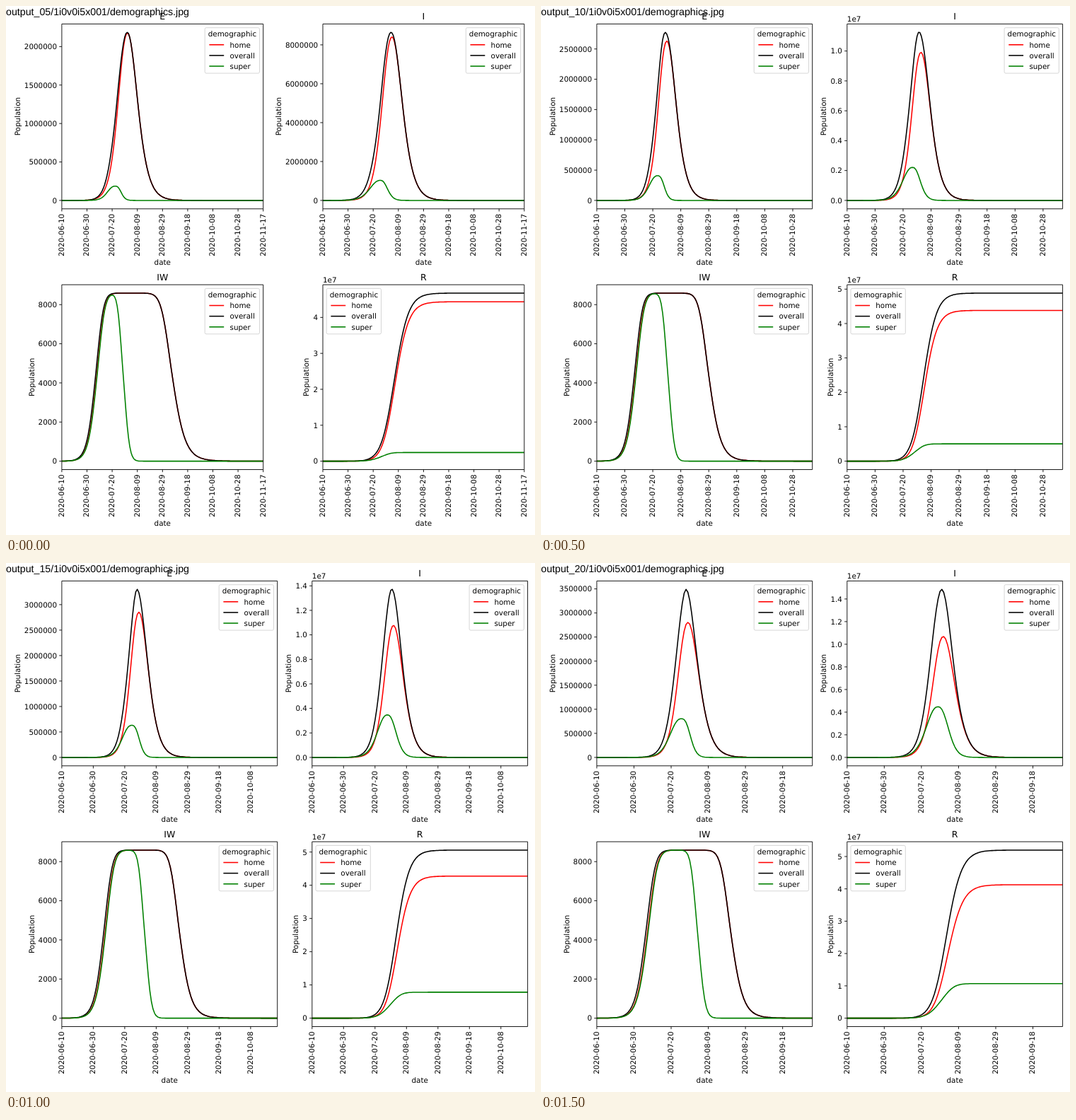
Write an HTML page that moves like this. It is 748x748 px and loops after 2 s.

```html
<!DOCTYPE html>
<html lang="en">
<head>
<meta charset="utf-8">
<title>Demographics</title>
<style>
html, body { margin: 0; width: 100%; height: 100%; overflow: hidden; background: #fff; }
svg { display: block; width: 748px; height: 748px; text-rendering: geometricPrecision; }
text { font: 10.39px "DejaVu Sans", sans-serif; }
.title { font-size: 12.47px; }
.path { font: 14.21px "Liberation Sans", Arial, sans-serif; }
.axis { fill: none; stroke: #000; stroke-width: .9; }
.line { fill: none; stroke-width: 1.56; stroke-linejoin: round; }
.box { fill: #fff; fill-opacity: .8; stroke: #ccc; stroke-opacity: .8; }
.scene { visibility: hidden; animation: show 2s step-end infinite; }
@keyframes show { 0% { visibility: visible; } 25%, 100% { visibility: hidden; } }
</style>
</head>
<body>
<svg id="stage" viewBox="0 0 748 748"></svg>
<script>
const EM = 10.39, LEFT = 78.9, TOP = 25.4, ROW = 368.7;
const HEIGHT = 261.4, PEAK = HEIGHT / 1.1, ZERO = PEAK * 1.05;
const SERIES = [['home', '#f00'], ['overall', '#000'], ['super', '#008000']];
const UNITS = { E: .5, I: 2, R: 10, IW: 2000 };

function add(parent, tag, attrs, content) {
  const el = document.createElementNS('http://www.w3.org/2000/svg', tag);
  for (const key in attrs) el.setAttribute(key, attrs[key]);
  if (content !== undefined) el.textContent = content;
  return parent.appendChild(el);
}

function label(parent, content, x, y, anchor = 'start', upright = false, cls = '') {
  const attrs = { x, y, 'text-anchor': anchor, class: cls };
  if (upright) attrs.transform = `rotate(-90 ${x} ${y})`;
  add(parent, 'text', attrs, content);
}

const textWidth = s => EM * [...s].reduce((sum, c) => sum + (c === '.' ? .318 : .636), 0);

// Epidemic wave with its own width and sharpness on each side.
const bell = (peak, left, right, kLeft, kRight) => t => {
  const d = t - peak;
  const u = d < 0 ? (-d / left) ** kLeft : (d / right) ** kRight;
  return 1 / Math.cosh(u) ** 2;
};

// Falling step; the upper and lower bends sharpen separately.
function drop(d, width, upper, lower) {
  const u = d / width;
  return 1 / (1 + Math.exp(u * (u < 0 ? 1 - upper * u : 1 + lower * u)));
}

function cumulate(values, total) {
  const sum = values.reduce((a, b) => a + b);
  let acc = 0;
  return values.map(v => (acc += v) / sum * total - v / sum * total / 2);
}

// Scene n has a super share of 5, 10, 15, 20 %; populations are in millions.
function makeScene(days, peakE, n) {
  const quad = (a, b, c = 0) => a + b * n + c * n * n;
  const times = Array.from({ length: days + 1 }, (_, day) => day);
  const total = quad(46.76, 2.25, -.17), superTotal = total * .0515 * (n + 1);
  const top = { E: peakE, I: peakE * quad(3.955, .1), R: total, IW: 8588 };

  const width = quad(9.6, -2.07, .4);
  const homePeak = quad(52.25, -2.7, .55), superPeak = quad(42.4, 1.05);
  const waves = {
    E: [bell(homePeak, width, width + 1, 1.12, 1), bell(superPeak, 7.7, 5.6, 1.2, 1.4)],
    I: [bell(homePeak + 2.75, width + .5, width + 1.3, 1.12, 1),
        bell(superPeak + 3.3, width + 1, 6.9, 1.15, 1.25)]
  };
  const heights = {
    E: [quad(.993, -.03, -.0105), quad(.085, .07, -.007)],
    I: [quad(.98, -.09, .002), quad(.1205, .087, -.0085)]
  };
  const sum = (a, b) => a.map((v, i) => v + b[i]);

  function wave(kind) {
    const [home, sup] = waves[kind].map((f, i) => times.map(t => heights[kind][i] * f(t)));
    const overall = sum(home, sup), scale = top[kind] / Math.max(...overall);
    return [home, overall, sup].map(values => values.map(v => v * scale));
  }

  function removed() {
    const [home, sup] = waves.I.map((f, i) =>
      cumulate(times.map(t => f(t - 2.2)), i ? superTotal : total - superTotal));
    return [home, sum(home, sup), sup];
  }

  function wards() {
    const rise = quad(26.7, 0, -.05), superRise = rise + 1.2, riseWidth = quad(3.45, -.2);
    const plateau = (start, end, endWidth, lower) => times.map(t =>
      top.IW * drop(start - t, riseWidth, .12, 0) * drop(t - end, endWidth, .17, lower));
    const fall = quad(87.9, -9, 1.26), fallWidth = quad(5.06, -1.05, .143);
    return [
      plateau(superRise - .3, fall, fallWidth, -.025),
      plateau(rise, fall, fallWidth, -.025),
      plateau(superRise, quad(48.9, 2.1, -.1), quad(2.6, -.16), .1)
    ];
  }

  return {
    days, top,
    name: String(5 * (n + 1)).padStart(2, '0'),
    width: n ? 304.8 : 284.8,
    right: n ? 432.8 : 448,
    curves: { E: wave('E'), I: wave('I'), R: removed(), IW: wards() }
  };
}

function legend(parent, x, y) {
  add(parent, 'rect', { x, y, width: 77.3, height: 64.4, rx: 2, class: 'box' });
  label(parent, 'demographic', x + 38.7, y + 12.4, 'middle');
  SERIES.forEach(([name, color], i) => {
    const cy = y + 24.1 + 15.15 * i;
    add(parent, 'path', { d: `M${x + 6.2} ${cy}h20.8`, class: 'line', stroke: color });
    label(parent, name, x + 35.3, cy + 3.7);
  });
}

function panel(parent, scene, kind, x, y) {
  const { width, days } = scene;
  const top = scene.top[kind], unit = UNITS[kind];
  const bottom = y + HEIGHT, zero = y + ZERO, mid = x + width / 2;
  const tens = kind === 'R' || (kind === 'I' && top > 10);
  const format = v => kind === 'IW' ? v : tens ? (v / 10).toFixed(kind === 'I' ? 1 : 0) : v * 1e6;
  const toX = day => x + day * width / days;
  const toY = v => zero - v * PEAK / top;

  let marks = `M${x} ${y}h${width}v${HEIGHT}h${-width}z`;
  for (let day = 0; day <= days; day += 20) {
    const date = new Date(Date.UTC(2020, 5, 10 + day)).toISOString().slice(0, 10);
    marks += `M${toX(day)} ${bottom}v3.64`;
    label(parent, date, toX(day) + 2.9, bottom + 7, 'end', true);
  }
  let widest = 0;
  for (let v = 0; v <= top * 1.05; v += unit) {
    const text = String(format(v));
    marks += `M${x} ${toY(v)}h-3.64`;
    label(parent, text, x - 6.9, toY(v) + 3.8, 'end');
    widest = Math.max(widest, textWidth(text));
  }

  scene.curves[kind].forEach((values, i) => {
    const points = values.map((v, day) => `${toX(day).toFixed(2)},${toY(v).toFixed(2)}`).join(' ');
    add(parent, 'polyline', { points, class: 'line', stroke: SERIES[i][1] });
  });
  add(parent, 'path', { d: marks, class: 'axis' });

  label(parent, kind, mid, y - 6.1, 'middle', false, 'title');
  label(parent, 'date', mid, bottom + 79.2, 'middle');
  label(parent, 'Population', x - 12.9 - widest, y + HEIGHT / 2, 'middle', true);
  if (tens) label(parent, '1e7', x, y - 3);
  legend(parent, kind === 'R' ? x + 5.2 : x + width - 82.5, y + 5.3);
}

const stage = document.getElementById('stage');
[[160, 2.185], [154, 2.774], [137, 3.3], [116, 3.49]].forEach(([days, peakE], n) => {
  const scene = makeScene(days, peakE, n);
  const g = add(stage, 'g', { class: 'scene', style: `animation-delay:${n * 500 - 2000}ms` });
  panel(g, scene, 'E', LEFT, TOP);
  panel(g, scene, 'I', scene.right, TOP);
  panel(g, scene, 'IW', LEFT, TOP + ROW);
  panel(g, scene, 'R', scene.right, TOP + ROW);
  label(g, `output_${scene.name}/1i0v0i5x001/demographics.jpg`, 0, 13.2, 'start', false, 'path');
});
</script>
</body>
</html>
```
